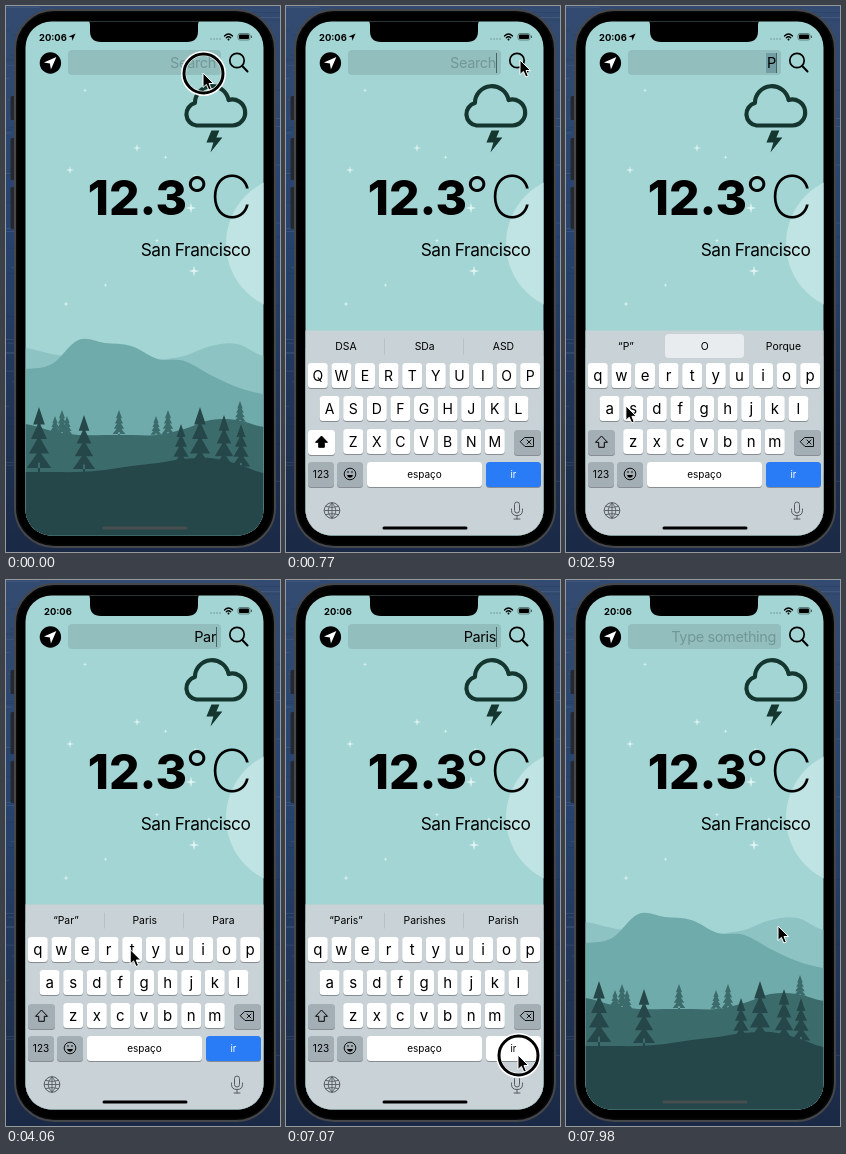
These frames come from a looping animation (274x546 px, 8000 ms). An HTML page:

```html
<!DOCTYPE html>
<html lang="en">
<head>
<meta charset="utf-8">
<title>Weather search</title>
<style>
  html, body { margin: 0; width: 100%; height: 100%; overflow: hidden; background: #213a60; }
  svg { display: block; width: 100vw; height: 100vh; }
  text { font-family: Inter, "Liberation Sans", sans-serif; }
  .mid { text-anchor: middle; }
  .end { text-anchor: end; }
  .tight { letter-spacing: -.025em; }
</style>
</head>
<body>
<svg id="stage" viewBox="0 0 274 546"></svg>
<script>
const LOOP = 8000, TAP = 140, TRAVEL = 680, SUBMIT = 7210, FOCUS = 280;
const WORD = 'Paris';
const ROWS = ['QWERTYUIOP', 'ASDFGHJKL', 'ZXCVBNM'];

// Centre of the key in a given row and column
const keyCentre = (row, col) => [138 - 11.8 * (ROWS[row].length - 1) + 23.6 * col, 369.5 + 33 * row];

function letterSpot(letter) {
  const row = ROWS.findIndex(keys => keys.includes(letter.toUpperCase()));
  return keyCentre(row, ROWS[row].indexOf(letter.toUpperCase()));
}

const taps = [1890, 2800, 3710, 4830, 5810].map((down, i) => ({ down, up: down + TAP, spot: letterSpot(WORD[i]) }));

// Places where the pointer rests; it travels on as soon as "up" has passed
const stops = [
  { down: 0, up: 70, spot: [197, 67] },
  { up: 850, spot: [234, 54] },
  ...taps,
  { down: 7000, up: SUBMIT, spot: [232, 475] },
  { up: LOOP, spot: [212, 346] }
];

const SUGGESTIONS = ['DSA SDa ASD', '“P” O Porque', '“Pa” Para Pai', '“Par” Paris Para', '“Pari” Paris Parity', '“Paris” Parishes Parish'];

const clamp = v => Math.min(1, Math.max(0, v));
const easeOut = v => 1 - (1 - clamp(v)) ** 3;
const smooth = v => clamp(v) ** 2 * (3 - 2 * clamp(v));

let seed = 7;
const random = () => (seed = seed * 16807 % 2147483647) / 2147483647;
const times = (n, fn) => Array.from({ length: n }, (_, i) => fn(i)).join('');

const rect = (x, y, w, h, r, fill, more = '') =>
  `<rect x="${x}" y="${y}" width="${w}" height="${h}" rx="${r}" fill="${fill}" ${more}/>`;
const circle = (x, y, r, more = '') => `<circle cx="${x}" cy="${y}" r="${r}" ${more}/>`;
const path = (d, fill, more = '') => `<path d="${d}" fill="${fill}" ${more}/>`;
const line = (d, color, width) =>
  path(d, 'none', `stroke="${color}" stroke-width="${width}" stroke-linecap="round" stroke-linejoin="round"`);
const label = (x, y, size, str, more = '') => `<text x="${x}" y="${y}" font-size="${size}" ${more}>${str}</text>`;

function desk() {
  return rect(0, 0, 274, 546, 0, 'url(#desk)') + times(260, () =>
    rect(random() * 274 - 30, random() * 546, 15 + random() * 45, .8, 0, random() < .5 ? '#fff' : '#000', 'opacity=".1"'));
}

function star(x, y, r) {
  const k = r * .18, m = r - k;
  return path(`M${x} ${y - r}l${k} ${m} ${m} ${k} ${-m} ${k} ${-k} ${m} ${-k} ${-m} ${-m} ${-k} ${m} ${-k}z`, '#e2f5f3');
}

function tree(x, base, height, color) {
  const half = 3 + height * .14;
  let d = '';
  for (let tier = 1; tier <= 4; tier++) {
    const w = half * (.3 + .175 * tier), y = base - height + height * .22 * tier;
    d += `M${x} ${y - height * .22 - 3}L${x - w} ${y}H${x + w}z`;
  }
  return path(d + `M${x - 1} ${base}v${-height * .2}h2v${height * .2}z`, color);
}

// A smooth skyline through evenly spaced heights
function ridge(heights, color) {
  const step = 238 / (heights.length - 1);
  const slope = i => ((heights[i + 1] ?? heights[i]) - (heights[i - 1] ?? heights[i])) / 6;
  let d = `M19.5 ${heights[0]}`;
  for (let i = 1; i < heights.length; i++) {
    const x = 19.5 + i * step;
    d += `C${x - step * 2 / 3} ${heights[i - 1] + slope(i - 1)} ${x - step / 3} ${heights[i] - slope(i)} ${x} ${heights[i]}`;
  }
  return path(d + 'V530H19.5z', color);
}

function landscape() {
  const far = '#3c6b6c', near = '#264749';
  return rect(19, 15, 239, 516, 0, '#a3d5d4') + circle(288, 237.5, 68, 'fill="#c0e4e3"') +
    star(64, 164, 4) + star(131, 142, 4) + star(185, 202, 5.5) + star(188, 265, 5.5) + star(60, 298, 3) +
    times(6, () => star(25 + random() * 200, 75 + random() * 225, 2.3)) +
    ridge([342, 348, 352, 356, 358, 354, 350, 340, 338, 350], '#8ec3c3') +
    ridge([363, 358, 334, 337, 340, 353, 355, 369, 381, 388], '#70abab') +
    ridge([418, 425, 429, 429, 429, 429, 423, 414, 414, 421], far) +
    [49, 56, 61, 113, 150, 162].map((x, i) => tree(x, 431, 18 + i % 2 * 6, far)).join('') + tree(234, 418, 20, far) +
    ridge([466, 466, 466, 464, 460, 457, 453, 452, 458, 467], near) +
    [33, 78, 194, 218].map((x, i) => tree(x, 470, 66 - i % 2 * 8, near)).join('') +
    [175, 235].map(x => tree(x, 466, 45, near)).join('');
}

function weather() {
  const ink = '#15352f';
  return circle(44.4, 57, 10.7) + path('M50.400 51l-12.500 5.500 6 1 1 6z', '#fff') +
    rect(62, 44, 153, 25, 4, '#000', 'fill-opacity=".1"') +
    circle(231, 54.5, 7.2, 'fill="none" stroke="#000" stroke-width="1.7"') + line('M236.300 60L241.500 65.500', '#000', 2) +
    `<g transform="translate(-.6 -.5)">${line('M191 120H227A13 13 0 1 0 223.2 94.5 17 17 0 0 0 189.5 97.5 11.5 11.5 0 0 0 191 120z', ink, 4.2)}
     ${path('M206 125h8l-3 7h6l-12 15 3-10h-7z', ink)}</g>` +
    label(181, 208.5, 48, '12.3', 'class="end" font-weight="800"') +
    label(203, 208, 52, '°', 'class="end" font-weight="300"') +
    label(246.5, 212, 59, 'C', 'class="end" font-weight="250"') +
    label(244.5, 250, 17.3, 'San Francisco', 'class="end tight"') +
    rect(200, 47, 11, 20, 0, '#41697c', 'id="mark" fill-opacity=".4"') +
    label(210, 62, 14.5, '', 'id="field" class="end tight"') +
    rect(210, 47, 1, 20, 0, '#456668', 'id="caret"');
}

const key = (x, y, w, fill, more = '') => rect(x, y + 1, w, 25, 3.5, '#878d92') + rect(x, y, w, 25, 3.5, fill, more);

function keyboard() {
  const gray = '#a4aeb5', icon = '#555c61';
  const letters = ROWS.map((keys, row) => [...keys].map((c, col) => {
    const [x, y] = keyCentre(row, col);
    return key(x - 10, y - 12.5, 20, '#fff') + label(x, y + 5, 14, c, 'class="mid letter"');
  }).join('')).join('');
  return rect(19, 324.5, 239, 206, 0, '#c9d2d6') +
    rect(99, 328, 79, 24, 4, '#e8ecef', 'id="pick"') +
    `<g id="bars">${line('M98.500 333V348M177.500 333V348', '#b3bcc1', .8)}</g>` +
    times(3, i => label(60 + 78.7 * i, 344, 10.4, '', 'class="mid suggestion"')) +
    letters +
    key(22, 424, 27, '#fff', 'id="shift"') +
    path('M35.500 430l6 6.300h-3.200v5h-5.600v-5h-3.200z', '#000', 'id="arrow" stroke="#000" stroke-linejoin="round"') +
    key(228, 424, 27, gray) + line('M239 431.500h8.500v9H239l-4.500-4.500zM241 434l4 4m0-4l-4 4', '#000', .9) +
    key(22, 456, 26, gray) + label(35, 472, 10, '123', 'class="mid"') +
    key(51, 456, 26, gray) + circle(64, 468, 5.8, 'fill="none" stroke="#000" stroke-width=".9"') +
    circle(62, 466, .8) + circle(66, 466, .8) + path('M61 469h6q-.7 2.800-3 2.800t-3-2.800', '#000') +
    key(81, 456, 115, '#fff') + label(138.5, 471.5, 10, 'espaço', 'class="mid"') +
    key(200, 456, 55, '#2a7cf6', 'id="go"') + label(227.5, 471.5, 9.5, 'ir', 'class="mid" id="goText"') +
    circle(46, 504.5, 7.8, `fill="none" stroke="${icon}"`) +
    line('M46 497v15M38.500 504.500h15M46 497q-8 7.500 0 15q8-7.500 0-15M40 500.500q6 2 12 0M40 508.500q6-2 12 0', icon, .9) +
    rect(228.5, 496, 5, 11, 2.5, 'none', `stroke="${icon}"`) +
    line('M225.500 503v1.500q0 5 5.500 5t5.500-5V503M231 509.500v3.500m-3 0h6', icon, 1);
}

function statusBar() {
  return path('M79 14q5 0 5 5v6q0 11 11 11h86q11 0 11-11v-6q0-5 5-5z', '#000') +
    label(33, 34.5, 9.4, '20:06', 'id="clock" font-weight="650"') +
    path('M69.500 27.500l-7 3.300 3.400.5.5 3.400z', '#000', 'id="locating"') +
    times(4, i => circle(205 + 3 * i, 33, .8, 'fill="#6f9796"')) +
    line('M218.500 30q4-4 8 0M220.300 31.700q2.200-2 4.400 0', '#000', 1.3) + circle(222.5, 33.5, 1) +
    rect(232, 27.5, 12, 6.5, 2, 'none', 'stroke="#42605f" stroke-width=".7"') + rect(233, 28.5, 10, 4.5, 1, '#000') +
    rect(245, 29.5, 1, 2.5, .5, '#42605f');
}

document.getElementById('stage').innerHTML = `
  <defs>
    <linearGradient id="desk" x2="0" y2="1">
      <stop stop-color="#334b70"/><stop offset=".4" stop-color="#27446f"/><stop offset="1" stop-color="#1a2945"/>
    </linearGradient>
    <clipPath id="screen">${rect(19.5, 15.5, 238, 514, 26, '#000')}</clipPath>
  </defs>
  ${desk()}
  ${rect(4.5, 90, 6, 24, 1.5, '#25282d') + rect(4.5, 132, 6, 42, 1.5, '#25282d') + rect(4.5, 181, 6, 42, 1.5, '#25282d')}
  ${rect(9, 4, 260, 537, 39, '#08090b', 'stroke="#45474b" stroke-width="2"')}
  ${rect(11.5, 6.5, 255, 532, 37, '#000')}
  <g clip-path="url(#screen)">
    ${landscape()}${weather()}
    <g id="keyboard">${keyboard()}</g>
    ${statusBar()}
    ${rect(96.5, 520.5, 85, 3, 1.5, '#000', 'id="home"')}
  </g>
  <g id="pointer">
    <g id="ring" fill="none" transform="translate(.5 .5)">${circle(0, 0, 20, 'stroke="#fff" stroke-width="5"') + circle(0, 0, 19.5, 'stroke="#000" stroke-width="3"')}</g>
    ${path('M0 0V14.500L3.400 11.400 5.800 17 8.300 16 6 10.500H10.500Z', '#000', 'stroke="#fff"')}
  </g>`;

const $ = id => document.getElementById(id);
const suggestionTexts = document.querySelectorAll('.suggestion');
const letterTexts = document.querySelectorAll('.letter');
const show = (id, on) => $(id).setAttribute('display', on ? 'inline' : 'none');
const fill = (id, color) => $(id).setAttribute('fill', color);

function drawField(t, since, text) {
  const done = t >= SUBMIT;
  const value = done ? '' : text;
  $('field').textContent = value || (done ? 'Type something' : 'Search');
  fill('field', value ? '#000' : '#719796');
  show('caret', t >= since && !done && (t - since) % 1000 < 600);
}

function drawKeyboard(t, since, text) {
  const lift = easeOut((t - 100) / 480) - easeOut((t - SUBMIT) / 480);
  $('keyboard').setAttribute('transform', `translate(0 ${206 * (1 - lift)})`);
  fill('home', lift > .1 ? '#000' : '#474f50');

  const upper = text === '';
  letterTexts.forEach(el => {
    el.textContent = upper ? el.textContent.toUpperCase() : el.textContent.toLowerCase();
    el.setAttribute('font-size', upper ? 14 : 15);
  });
  fill('shift', upper ? '#fff' : '#a4aeb5');
  fill('arrow', upper ? '#000' : 'none');

  const words = SUGGESTIONS[text.length].split(' ');
  suggestionTexts.forEach((el, i) => { el.textContent = words[i]; });
  // A one-letter input is about to be replaced by the middle suggestion
  const replacing = text.length === 1 && t > since + TAP;
  show('mark', replacing);
  show('pick', replacing);
  show('bars', !replacing);

  const pressed = t >= 7000 && t < SUBMIT;
  fill('go', pressed ? '#fff' : '#2a7cf6');
  fill('goText', pressed ? '#000' : '#fff');
}

function drawPointer(t) {
  const next = Math.max(1, stops.findLastIndex(s => s.up <= t) + 1);
  const from = stops[next - 1], to = stops[next];
  const k = smooth((t - from.up) / TRAVEL);
  const [x, y] = from.spot.map((v, i) => v + (to.spot[i] - v) * k);
  $('pointer').setAttribute('transform', `translate(${x} ${y})`);
  show('ring', stops.some(s => t >= s.down && t < s.up));
}

function draw(t) {
  const typed = taps.filter(tap => tap.up <= t);
  const since = typed.length ? typed[typed.length - 1].up : FOCUS;
  const text = WORD.slice(0, typed.length);
  drawField(t, since, text);
  drawKeyboard(t, since, text);
  drawPointer(t);
  const locating = t < 3640;
  show('locating', locating);
  $('clock').setAttribute('x', locating ? 33 : 38);
}

const start = performance.now();
function tick() {
  draw((performance.now() - start) % LOOP);
  requestAnimationFrame(tick);
}
tick();
</script>
</body>
</html>
```
